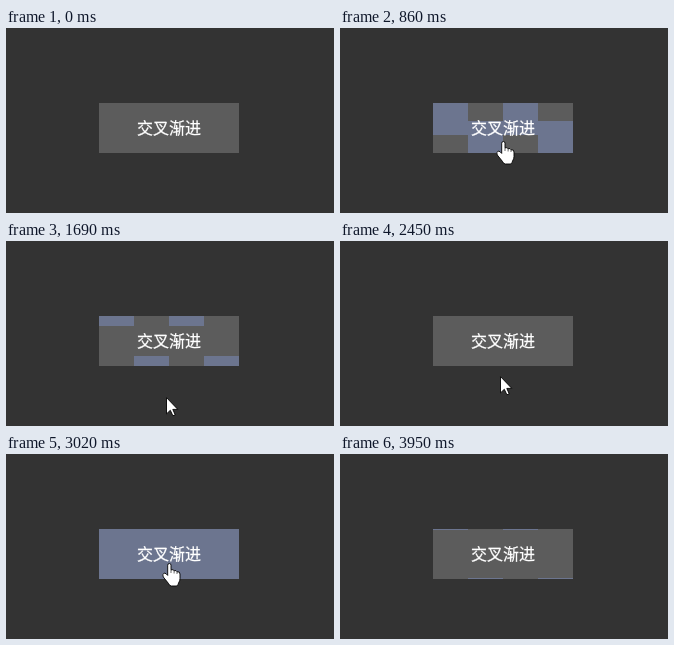
Recreate the animation shown at these times as an HTML page. Size 328 px wide and 185 px high, loop 4740 ms.

```html
<!DOCTYPE html>
<html lang="zh">
<head>
<meta charset="utf-8">
<style>
  html, body { margin: 0; width: 100%; height: 100%; overflow: hidden; background: #333; }
  .button {
    position: absolute; left: 93px; top: 75px; width: 140px; height: 50px;
    background: #5c5c5c; overflow: hidden;
  }
  .bar { position: absolute; width: 35px; height: 0; background: #6c758f; }
  .label {
    position: absolute; inset: 0; text-align: center; color: #fff;
    font: 16px/48px "Noto Sans CJK SC", "Noto Sans CJK", sans-serif;
    -webkit-text-stroke: .25px #fff;
  }
  .cursor { position: absolute; left: 0; top: 0; width: 20px; height: 25px; overflow: visible; visibility: hidden; }
  .cursor path { fill: #fff; stroke: #000; stroke-width: .9; stroke-linejoin: round; }
  .cursor .fold { fill: none; stroke-width: .6; }
</style>
</head>
<body>
<div class="button">
  <div class="label">交叉渐进</div>
</div>
<svg class="cursor" id="arrow">
  <path d="M.5 .6V16.9L4.3 13.3L6.9 18.8L9.2 17.8L6.8 12.4H11.8Z"/>
</svg>
<svg class="cursor" id="hand">
  <path d="M5.7 2.2Q5.8 .5 7.4 .5Q9 .5 9 2.2V6.9Q11.4 6 12.1 7.7Q14.4 6.9 15 8.8Q17.9 8.1 18 11V15.5Q18 18 16.6 19.8Q16.4 23 14.2 23H9.4Q7.4 23 6.6 20.6L1.3 14Q-.2 11 2.2 10.2Q4 10 5.7 12.4Z"/>
  <path class="fold" d="M9 7V10M12.1 7.8V10.5M15 8.9V11"/>
</svg>
<script>
const LOOP = 4740, FADE = 500, SHOW = 560, HIDE = 3680;

// Hover changes: the fade runs from `start` but is seen from `first` on, every `gap` ms.
const changes = [
  { start: 671, first: 710, gap: 150, over: true },
  { start: 1445, first: 1570, gap: 120, over: false },
  { start: 2507, first: 2570, gap: 150, over: true },
  { start: 3497, first: 3560, gap: 120, over: false }
];

// Pointer stops: time, x, y
const stops = [
  [SHOW, 148, 162], [710, 156, 113], [1420, 156, 118], [1570, 160, 156],
  [2450, 160, 135], [2570, 156, 117], [2720, 156, 109], [3560, 153, 160]
];

const button = document.querySelector('.button');
const cursors = document.querySelectorAll('.cursor');
const bars = Array.from({ length: 4 }, (_, i) => {
  const bar = document.createElement('div');
  bar.className = 'bar';
  bar.style.left = i * 35 + 'px';
  bar.style[i % 2 ? 'bottom' : 'top'] = 0;
  button.prepend(bar);
  return bar;
});

const bezier = (s, a, b) => 3 * a * s * (1 - s) ** 2 + 3 * b * s * s * (1 - s) + s ** 3;

// CSS "ease": cubic-bezier(.25, .1, .25, 1)
function ease(x) {
  if (x >= 1) return 1;
  let lo = 0, hi = 1;
  for (let i = 0; i < 20; i++) {
    const mid = (lo + hi) / 2;
    if (bezier(mid, .25, .25) < x) lo = mid; else hi = mid;
  }
  return bezier(lo, .1, 1);
}

function barHeight(change, t) {
  if (!change) return 0;
  const { start, first, gap, over } = change;
  const seen = first + Math.floor((t - first) / gap) * gap;
  const p = ease((seen - start) / FADE);
  return Math.round(50 * (over ? p : 1 - p));
}

function draw() {
  const t = performance.now() % LOOP;
  const change = changes.findLast(c => c.first <= t);
  const height = barHeight(change, t) + 'px';
  for (const bar of bars) bar.style.height = height;

  const [, x, y] = stops.findLast(s => s[0] <= t) || stops[0];
  const kind = change?.over ? 'hand' : 'arrow';
  for (const el of cursors) {
    const shown = el.id === kind && t >= SHOW && t < HIDE;
    el.style.visibility = shown ? 'visible' : 'hidden';
    el.style.transform = `translate(${x}px, ${y}px)`;
  }
  requestAnimationFrame(draw);
}
draw();
</script>
</body>
</html>
```
